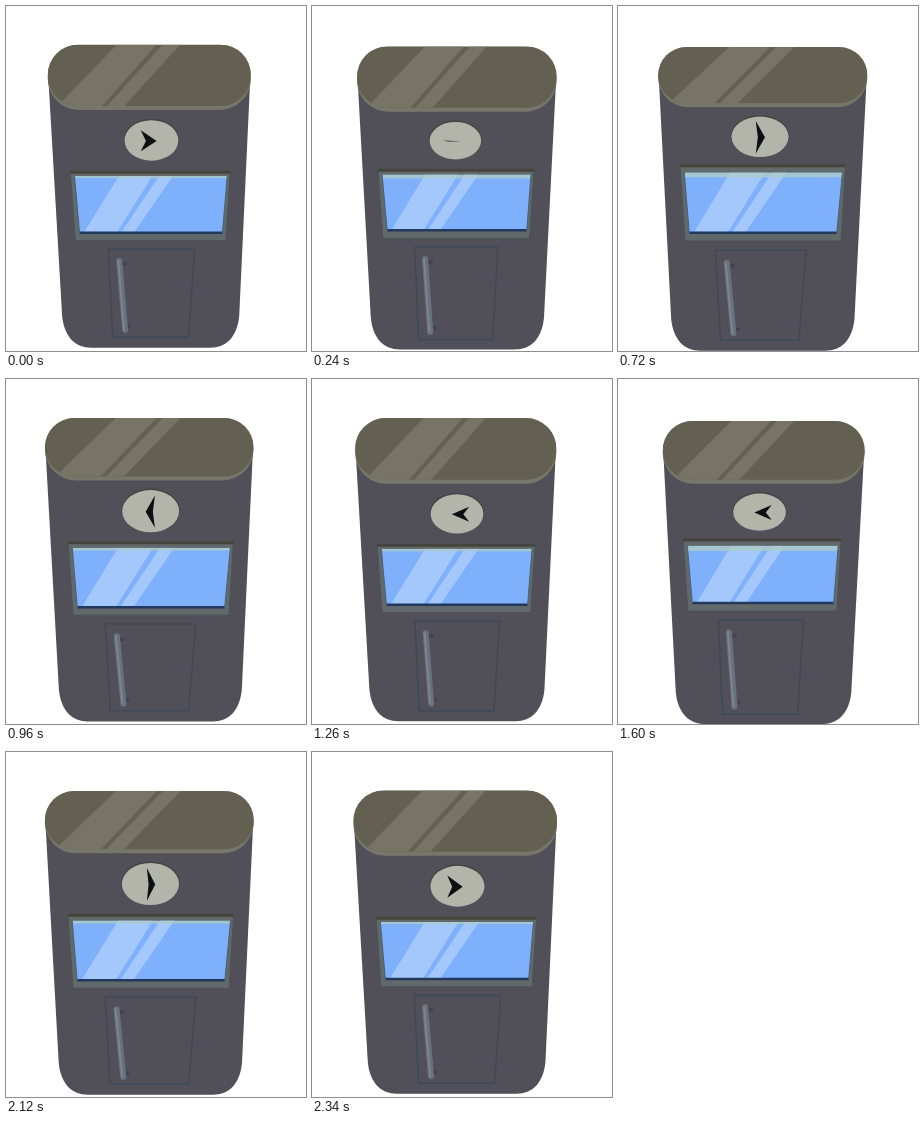
An HTML page with a canvas for the animation above (2.36 s loop, 300 by 345 pixels).

```html
<!DOCTYPE html>
<html lang="en">
<head>
<meta charset="utf-8">
<title>Kiosk</title>
<style>
html, body { margin: 0; width: 100%; height: 100%; overflow: hidden; background: #fff; }
canvas { display: block; width: 300px; height: 345px; }
</style>
</head>
<body>
<canvas id="stage" width="300" height="345"></canvas>
<script>
const ctx = document.getElementById('stage').getContext('2d');
const LOOP = 2360, TAU = Math.PI * 2;
let u = 0, v = 0;

// A coordinate that follows the circling viewpoint.
const m = (c, a = 0, b = 0) => c + a * u + b * v;
const mix = (a, b, k) => a + (b - a) * k;

function trace(pts) {
  ctx.beginPath();
  pts.forEach(([x, y]) => ctx.lineTo(x, y));
  ctx.closePath();
}

function poly(color, pts) {
  trace(pts);
  ctx.fillStyle = color;
  ctx.fill();
}

function outline(color, width, pts) {
  trace(pts);
  ctx.strokeStyle = color;
  ctx.lineWidth = width;
  ctx.stroke();
}

function line(color, width, x1, y1, x2, y2) {
  ctx.beginPath();
  ctx.moveTo(x1, y1);
  ctx.lineTo(x2, y2);
  ctx.strokeStyle = color;
  ctx.lineWidth = width;
  ctx.stroke();
}

function oval(color, x, y, rx, ry) {
  ctx.beginPath();
  ctx.ellipse(x, y, rx, ry, 0, 0, TAU);
  ctx.fillStyle = color;
  ctx.fill();
}

// Diagonal reflection between a top and a bottom edge.
function shine(color, top, bottom, t0, t1, b0, b1) {
  const at = (e, k) => [mix(e[0], e[1], k), e[2]];
  poly(color, [at(top, t0), at(top, t1), at(bottom, b1), at(bottom, b0)]);
}

function drawBody(l, r, lidBase) {
  const bl = m(56.6, -.3, 3.2), br = m(233.3, -.5, -2.3), base = m(343.6, -1.8);
  const y0 = lidBase - 33;
  ctx.beginPath();
  ctx.moveTo(l + .5, y0);
  ctx.lineTo(r - .5, y0);
  ctx.lineTo(br + 1, base - 32);
  ctx.bezierCurveTo(br - 1, base - 11, br - 12, base, br - 28, base);
  ctx.lineTo(bl + 28, base);
  ctx.bezierCurveTo(bl + 12, base, bl + 1, base - 11, bl - 1, base - 32);
  ctx.closePath();
  ctx.fillStyle = '#514f58';
  ctx.fill();
}

function drawLid(l, r, top, base) {
  const w = r - l;
  ctx.beginPath();
  ctx.roundRect(l, top, w, base - top, 31);
  ctx.fillStyle = '#77766a';
  ctx.fill();
  ctx.save();
  ctx.beginPath();
  ctx.roundRect(l, top, w, base - top - 4, 30);
  ctx.clip();
  ctx.fillStyle = '#636052';
  ctx.fillRect(l, top, w, base - top);
  const t = [l, r, top], b = [l, r, base];
  shine('#777466', t, b, .34, .535, .03, .25);
  shine('#777466', t, b, .565, .65, .275, .36);
  ctx.restore();
}

function drawSign(q) {
  const x = m(143.3, 2.2), y = m(132.9, 1.1, 1.75);
  const rx = m(27.3, 0, -1.5), ry = m(19.8, .75, -1.05);
  oval('#45443f', x, y - 1, rx + .7, ry + .5);
  oval('#b3b4aa', x, y, rx, ry);
  const lag = .27 * Math.exp(-(((q - .195) / .05) ** 2));
  const turn = TAU * (q - .106);
  const wing = (k, side) => {
    const a = turn - lag * k;
    return [x - 13.5 * Math.cos(a), y + .4 + side * 17 * Math.abs(Math.sin(a))];
  };
  const c = Math.cos(turn);
  poly('#0b1010', [
    [x + 5.2 * Math.tanh(6 * c), y + .5],
    wing(1.1, -1),
    [x - 7 * c, y + .5],
    wing(.8, 1)
  ]);
}

function drawWindow() {
  const l = m(63.7, 0, 2.1), r = m(225.1, 0, -3);
  const t = m(161.3, 3.3, 1.4), b = m(234, 1.1, -1.9);
  const frame = [[l, t], [r, t], [r - 4.5, b], [l + 5, b]];
  poly('#62696a', frame);
  outline('#4b5357', 1, frame);
  line('#46453d', 3, l, t + 1.5, r, t + 1.5);

  const gl = m(68, 0, 2.1), gr = m(222, 0, -3), gt = m(168, 2, .5);
  const hl = m(73, 0, 2.2), hr = m(217, 0, -2.2), gb = m(226, 1.2, -1.8);
  const glass = [[gl, gt], [gr, gt], [hr, gb], [hl, gb]];
  ctx.save();
  trace(glass);
  ctx.clip();
  ctx.fillStyle = '#7eb0fc';
  ctx.fillRect(gl, gt, gr - gl, gb - gt);
  const top = [gl, gr, gt], low = [hl, hr, gb];
  shine('#a4c8fc', top, low, .29, .51, .03, .26);
  shine('#a4c8fc', top, low, .555, .645, .29, .38);
  ctx.fillStyle = 'rgba(174,204,198,.8)';
  ctx.fillRect(gl, gt, gr - gl, m(3.8, -1.8));
  ctx.restore();
  line('#22395f', 2.5, hl, gb, hr, gb);
  line('#4c6078', 1, gl, gt, hl, gb);
  line('#4c6078', 1, gr, gt, hr, gb);
}

function drawDoor() {
  const t = m(243, .7, -2), b = m(333.3, -2.1, .35);
  outline('#3f4a59', 1.6, [
    [m(100.2, 1.6, 2.3), t],
    [m(187.6, 1.5, -1.75), t],
    [m(181.2, 1.5, -.7), b],
    [m(104.8, 1.5, 1.75), b]
  ]);
  const x1 = m(111.2, 1.7, 1.8), y1 = m(255.2, .4, -2.3);
  const x2 = m(117.2, 1.7, 1), y2 = m(326, -2);
  ctx.lineCap = 'round';
  line('#42454f', 4, x1 + 1, y1 + 3, x1 + 6, y1 + 3);
  line('#42454f', 4, x2, y2 - 4, x2 + 4, y2 - 4);
  line('#68717d', 6, x1, y1, x2, y2);
  line('#7b848f', 2, x1 - 1, y1, x2 - 1, y2);
  ctx.lineCap = 'butt';
}

function draw(time) {
  const q = (time % LOOP) / LOOP;
  const a = TAU * (q * 2 - .96);
  u = Math.cos(a);
  v = Math.sin(a);
  ctx.fillStyle = '#fff';
  ctx.fillRect(0, 0, 300, 345);
  const l = m(42, -1.05, 3.1), r = m(246.8, -1.5, -2.1);
  const top = m(40.3, -1.8, .35), base = m(103.3, 0, 2.4);
  drawBody(l, r, base);
  drawLid(l, r, top, base);
  drawSign(q);
  drawWindow();
  drawDoor();
}

const start = performance.now();
function tick(now) {
  draw(Math.max(0, now - start));
  requestAnimationFrame(tick);
}
draw(0);
requestAnimationFrame(tick);
</script>
</body>
</html>
```
